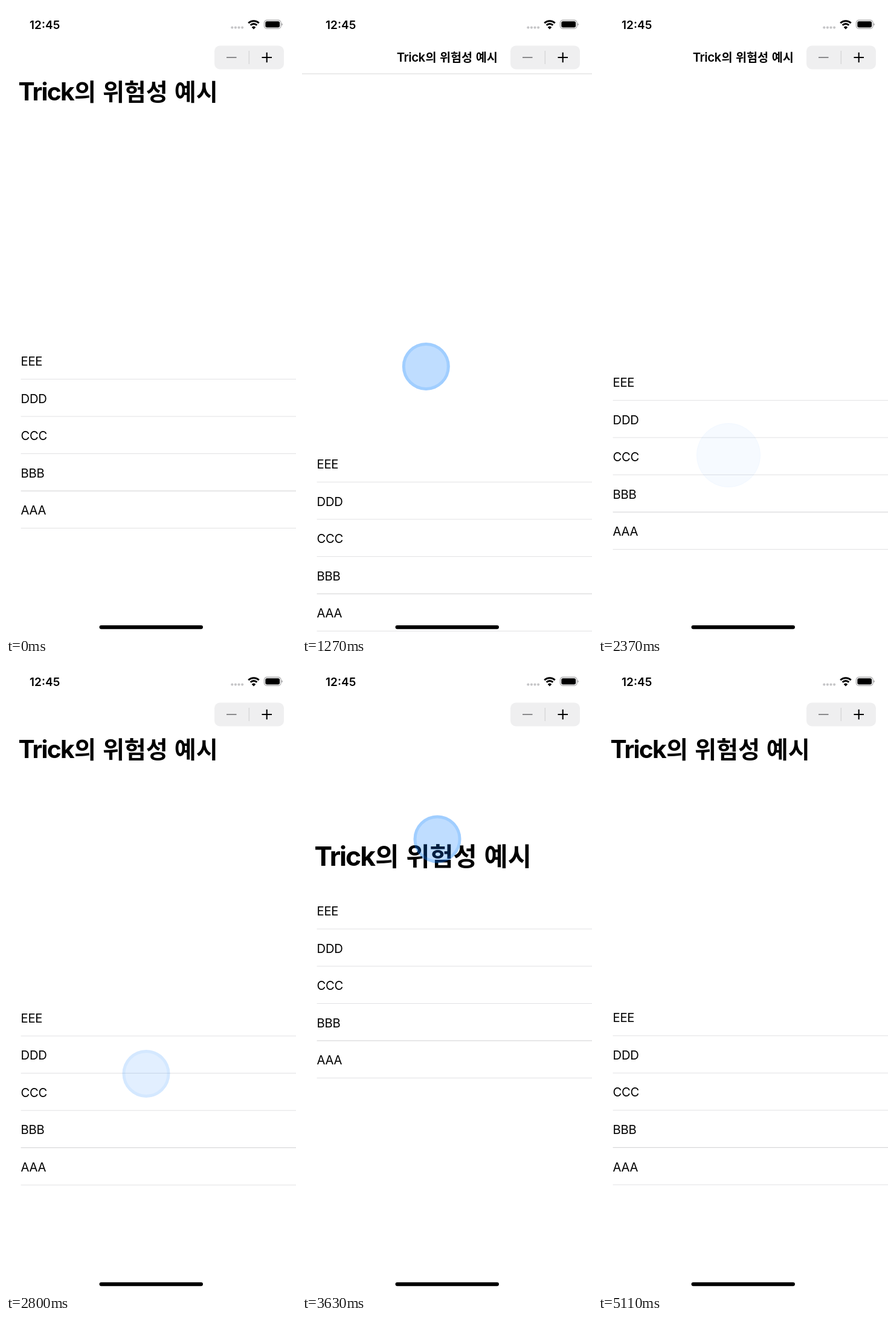
Write an HTML page that moves like this. It is 480 by 1039 pixels and loops after 5140 ms.

```html
<!DOCTYPE html>
<html lang="ko">
<head>
<meta charset="utf-8">
<title>List demo</title>
<style>
  html, body { margin: 0; width: 100%; height: 100%; overflow: hidden; background: #fff; }
  svg { display: block; width: 100%; height: 100%; }
  text { font-family: Inter, "Noto Sans CJK KR", sans-serif; fill: #000; }
  .ko { font-family: "Noto Sans CJK KR", "Noto Sans CJK", sans-serif; }
  .row { font-size: 20.3px; letter-spacing: -.3px; }
  .clock { font-size: 19px; font-weight: 600; text-anchor: middle; }
</style>
</head>
<body>
<svg viewBox="0 0 480 1039" xmlns="http://www.w3.org/2000/svg">
  <defs>
    <clipPath id="belowBar"><rect y="112" width="480" height="927"/></clipPath>
  </defs>
  <rect width="480" height="1039" fill="#fff"/>

  <g id="list"></g>

  <g clip-path="url(#belowBar)">
    <g id="large" font-weight="700">
      <text x="20.5" y="156.3" font-size="40.8" letter-spacing="-1.8">Trick</text>
      <text class="ko" x="113" y="156.2" font-size="39.1">의 위험성 예시</text>
    </g>
  </g>

  <g id="small">
    <text x="156.8" y="92.4" font-size="20.4" font-weight="600" letter-spacing="-.5">Trick</text>
    <text class="ko" x="204.4" y="92.4" font-size="19.65" font-weight="700">의 위험성 예시</text>
  </g>
  <path id="barLine" d="M0 112H480" stroke="#d6d6d7"/>

  <g id="stepper" fill="none">
    <rect x="345" y="65.5" width="115" height="39" rx="9" fill="#efeff0"/>
    <path d="M402.3 74V96" stroke="#d2d2d4" stroke-width="1.2"/>
    <path d="M365 85H381.5" stroke="#8b8b8d" stroke-width="2"/>
    <path d="M423.5 85H440M431.7 76.8V93.2" stroke="#000" stroke-width="2.1"/>
  </g>

  <g id="status">
    <text class="clock" x="64.2" y="37.7">12:45</text>
    <g id="dots" fill="#c6c6c8"></g>
    <g id="wifi" fill="none" stroke="#000" stroke-width="3"></g>
    <rect x="427.4" y="23.4" width="27.6" height="14" rx="4.4" fill="none" stroke="#a3a3a5" stroke-width="1.2"/>
    <rect x="429.3" y="25.3" width="23.8" height="10.2" rx="2.7"/>
    <path d="M456.2 28.3q1.6.6 1.6 2.1t-1.6 2.1z" fill="#a3a3a5"/>
  </g>

  <rect x="154.5" y="1023" width="171.5" height="6.2" rx="3.1"/>

  <g id="touch">
    <circle r="39.5" fill="#007aff" fill-opacity=".25"/>
    <circle id="ring" fill="none" stroke="#007aff" stroke-opacity=".16"/>
  </g>
</svg>

<script>
const LOOP = 5140, HEIGHT = 1039, ROW = 61.54, FIRST_LINE = 616.4, RADIUS = 39.5;
const $ = id => document.getElementById(id);

function set(id, attrs) {
  for (const k in attrs) $(id).setAttribute(k, attrs[k]);
}

function add(parent, tag, attrs, label) {
  const el = document.createElementNS("http://www.w3.org/2000/svg", tag);
  for (const k in attrs) el.setAttribute(k, attrs[k]);
  if (label) el.textContent = label;
  $(parent).append(el);
}

["EEE", "DDD", "CCC", "BBB", "AAA"].forEach((label, i) => {
  const y = FIRST_LINE + i * ROW;
  add("list", "text", { class: "row", x: 24.6, y: y - 22.3 }, label);
  add("list", "path", { d: `M24.6 ${y}H480`, stroke: i === 3 ? "#cfcfd1" : "#e1e1e3" });
});

for (let i = 0; i < 4; i++) add("dots", "circle", { cx: 374.3 + i * 5.6, cy: 35.6, r: 2.1 });

for (const r of [12.3, 7.5, 2.6]) {
  const d = r * Math.SQRT1_2;
  add("wifi", "path", {
    d: `M${410 - d} ${37 - d}A${r} ${r} 0 0 1 ${410 + d} ${37 - d}` + (r < 3 ? "L410 37Z" : ""),
    ...(r < 3 && { fill: "#000", "stroke-width": 2 })
  });
}

// Each drag: time pressed, time released, finger path as [time, x, y].
const drags = [
  { down: 795, up: 2180, path: [
    [860, 198, 226], [1270, 205.3, 595], [1830, 216, 739], [1930, 216, 742]] },
  { down: 2755, up: 4527, path: [
    [2790, 232, 679], [3130, 226, 428], [3230, 225.5, 391], [3630, 224, 291],
    [3770, 224, 284], [3860, 224.3, 284], [4170, 227.5, 242]] }
];

const clamp = v => Math.min(1, Math.max(0, v));
const ramp = (t, from, to) => clamp((t - from) / (to - from));

// Monotone cubic interpolation of column c.
function along(path, t, c) {
  const last = path.length - 1;
  if (t <= path[0][0]) return path[0][c];
  if (t >= path[last][0]) return path[last][c];
  const slope = i => (path[i + 1][c] - path[i][c]) / (path[i + 1][0] - path[i][0]);
  const tangent = i => {
    if (i === 0 || i === last) return 0;
    const a = slope(i - 1), b = slope(i);
    return a * b > 0 ? 2 * a * b / (a + b) : 0;
  };
  let i = 0;
  while (t > path[i + 1][0]) i++;
  const h = path[i + 1][0] - path[i][0], u = (t - path[i][0]) / h, v = 1 - u;
  return path[i][c] * (1 + 2 * u) * v * v + path[i + 1][c] * u * u * (3 - 2 * u)
    + h * u * v * (tangent(i) * v - tangent(i + 1) * u);
}

// Scroll view resistance while dragging past the edge.
function rubber(d) {
  return Math.sign(d) * HEIGHT * (1 - 1 / (1 + 0.55 * Math.abs(d) / HEIGHT));
}

function pull({ up, path }, t) {
  const held = rubber(along(path, Math.min(t, up), 2) - path[0][2]);
  return t > up ? held * Math.exp(-0.0097 * (t - up)) : held;
}

function render(t) {
  const drag = t < drags[1].down ? drags[0] : drags[1];
  const off = t < drags[0].down ? 0 : pull(drag, t);
  set("list", { transform: `translate(0 ${off})` });

  const grow = 1 + Math.max(0, -off) * 0.0005;
  const inline = ramp(t, 960, 1090) - ramp(t, 2385, 2520);
  set("large", {
    transform: `translate(20.5 ${141.5 - off}) scale(${grow}) translate(-20.5 -141.5)`,
    opacity: 1 - inline
  });
  set("small", { opacity: inline });
  set("barLine", { opacity: clamp((off - 54) / 10) });

  // On release the dot grows and fades while its rim thins out.
  const fade = (1 - ramp(t, drag.up, drag.up + 310)) ** 2;
  const x = along(drag.path, t, 1), y = along(drag.path, t, 2);
  set("touch", {
    transform: `translate(${x} ${y}) scale(${1.4 - 0.4 * fade})`,
    opacity: ramp(t, drag.down, drag.down + 100) * fade
  });
  set("ring", { r: RADIUS - 2.5 * fade, "stroke-width": 5 * fade });
}

const start = performance.now();
function tick() {
  render((performance.now() - start) % LOOP);
  requestAnimationFrame(tick);
}
tick();
</script>
</body>
</html>
```
